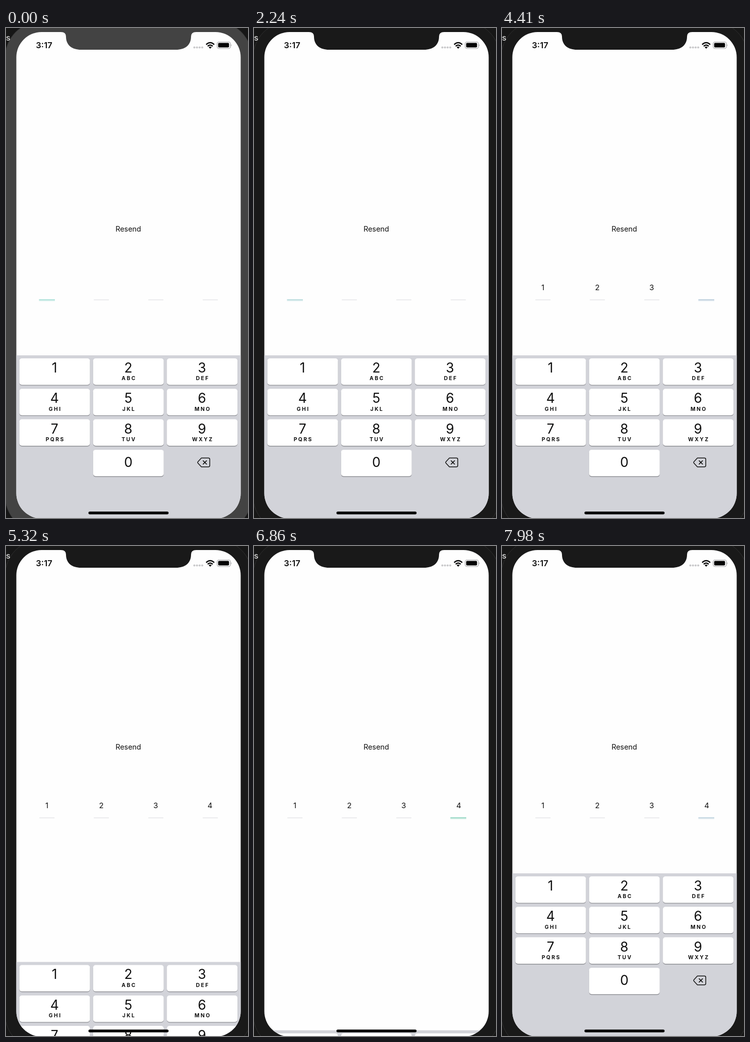
An HTML page that plays this animation: 480 by 970 pixels, repeating every 8000 ms.

```html
<!DOCTYPE html>
<html lang="en">
<head>
<meta charset="utf-8">
<title>Code entry</title>
<style>
  html, body { margin: 0; width: 100%; height: 100%; overflow: hidden; background: #161616; }
  svg { display: block; width: 480px; height: 970px; font-family: Inter, Roboto, "Liberation Sans", sans-serif; }
  text { text-anchor: middle; fill: #111; }
  .clock { font-size: 16.6px; font-weight: 600; }
  .label { font-size: 14.5px; letter-spacing: -.1px; }
  .digit { font-size: 15px; }
  .num { font-size: 26.5px; }
  .abc { font-size: 10.4px; font-weight: 700; letter-spacing: 2.4px; }
  .tab { font-size: 16px; font-weight: 500; text-anchor: end; fill: #ddd; }
</style>
</head>
<body>
<svg viewBox="0 0 480 970">
  <defs>
    <clipPath id="screen"><rect x="20.5" y="8" width="445" height="963" rx="50"/></clipPath>
  </defs>
  <rect width="480" height="970" fill="#161616"/>
  <rect class="bezel" x="-2" y="-13" width="490" height="1011" rx="72" stroke="#303030"/>
  <text class="tab" x="8.5" y="25">js</text>

  <g clip-path="url(#screen)">
    <rect x="20" y="7" width="446" height="964" fill="#fefefe"/>
    <text class="label" x="242.5" y="403.3">Resend</text>
    <g id="fields"></g>
    <g id="keyboard"><rect x="20" y="648" width="446" height="323" fill="#d2d3d9"/></g>
    <rect x="163.5" y="957.2" width="159" height="5.6" rx="2.8" fill="#050505"/>
  </g>

  <path class="bezel" d="M109 7V8Q119 8 119 17C119 34 131 43 149 43H337C355 43 367 34 367 17Q367 8 377 8V7Z"/>
  <text class="clock" x="75.5" y="40.4">3:17</text>
  <g fill="#c9c9cb">
    <circle cx="373.6" cy="38.5" r="2.1"/><circle cx="378.8" cy="38.5" r="2.1"/>
    <circle cx="384" cy="38.5" r="2.1"/><circle cx="389.2" cy="38.5" r="2.1"/>
  </g>
  <g fill="none" stroke="#050505" stroke-width="2.4">
    <path d="M397 32.8Q405 25.4 413 32.8"/>
    <path d="M400 36Q405 31.6 410 36"/>
  </g>
  <path d="M402 38Q405 35.6 408 38L405 41Z" fill="#050505"/>
  <rect x="418.8" y="27.6" width="26.4" height="13" rx="3.8" fill="#fff" stroke="#b4b4b6" stroke-width="1.4"/>
  <rect x="420.8" y="29.6" width="21.6" height="9" rx="2" fill="#050505"/>
  <path d="M446.3 32Q448.4 34 446.3 36.4Z" fill="#a4a4a6"/>
</svg>
<script>
const LOOP = 8000, STEP = 70, TRAVEL = 322;
const FOCUS = 1260, HIDE = 5220, SHOW = 6844;
const TYPED = [3150, 3640, 4130, 5040];
const BLUR = 5180;
const TINTS = [[7490, '#c8d9e3'], [BLUR, '#a3dccb'], [3150, '#c3d3e0'], [2170, '#bfdfe0'], [0, '#b3e3dc']];

const $ = q => document.querySelector(q);
function add(parent, tag, attrs, text) {
  const el = document.createElementNS('http://www.w3.org/2000/svg', tag);
  for (const k in attrs) el.setAttribute(k, attrs[k]);
  if (text) el.textContent = text;
  return parent.appendChild(el);
}

const keyboard = $('#keyboard');
const LETTERS = ['', 'ABC', 'DEF', 'GHI', 'JKL', 'MNO', 'PQRS', 'TUV', 'WXYZ'];
function key(col, row, num, letters) {
  const x = 26.5 + col * 146.3, y = 654 + row * 60.3, mid = x + 70;
  add(keyboard, 'rect', { x, y: y + 1.4, width: 140, height: 52.4, rx: 5, fill: '#909196' });
  add(keyboard, 'rect', { x, y, width: 140, height: 52.4, rx: 5, fill: '#fff' });
  add(keyboard, 'text', { class: 'num', x: mid - .3, y: y + (num ? 28 : 34.5) }, String(num));
  if (letters) add(keyboard, 'text', { class: 'abc', x: mid + 1.2, y: y + 43.4 }, letters);
}
LETTERS.forEach((s, i) => key(i % 3, Math.floor(i / 3), i + 1, s));
key(1, 3, 0);
add(keyboard, 'path', {
  d: 'M387.5 851.3H401.5Q404.2 851.3 404.2 854V866Q404.2 868.7 401.5 868.7H387.5L380.6 861.2Q379.6 860 380.6 858.8ZM391 856.6L397.8 863.4M397.8 856.6L391 863.4',
  fill: 'none', stroke: '#111', 'stroke-width': 1.5, 'stroke-linecap': 'round', 'stroke-linejoin': 'round'
});

const fields = TYPED.map((at, i) => {
  const x = 81 + i * 108, g = $('#fields');
  return {
    x, at,
    digit: add(g, 'text', { class: 'digit', y: 519 }, String(i + 1)),
    glow: add(g, 'rect', { x: x - 15.5, y: 536, width: 31.5, height: 6, opacity: .15 }),
    line: add(g, 'rect', {})
  };
});

// Critically damped spring: the share of the way still to go.
function rest(ms) {
  const u = Math.max(0, ms) * .01826;
  return (1 + u) * Math.exp(-u);
}

function activeField(t) {
  if (t >= SHOW) return 3;
  if (t >= BLUR) return -1;
  return Math.min(3, TYPED.filter(at => t >= at).length);
}

function draw(t) {
  const bezel = t < FOCUS ? '#434343' : '#191919';
  document.querySelectorAll('.bezel').forEach(el => el.setAttribute('fill', bezel));

  const drop = t < SHOW ? 1 - rest(t - HIDE) : rest(t - SHOW);
  keyboard.setAttribute('transform', `translate(0 ${(drop * TRAVEL).toFixed(2)})`);

  const active = activeField(t), tint = TINTS.find(([from]) => t >= from)[1];
  fields.forEach((f, i) => {
    const on = i === active;
    f.digit.setAttribute('x', f.x + (on ? 1 : i === 3 ? -.5 : 0));
    f.digit.setAttribute('visibility', t >= f.at ? 'visible' : 'hidden');
    f.glow.setAttribute('fill', on ? tint : 'none');
    const box = on
      ? { x: f.x - 15.5, y: 537, width: 31.5, height: 2.6, fill: tint }
      : { x: f.x - 14.8, y: 537.5, width: 30, height: 1.5, fill: '#e5e6e8' };
    for (const k in box) f.line.setAttribute(k, box[k]);
  });
}

const start = performance.now();
function frame() {
  const t = (performance.now() - start) % LOOP;
  draw(Math.floor(t / STEP) * STEP);
  requestAnimationFrame(frame);
}
frame();
</script>
</body>
</html>
```
